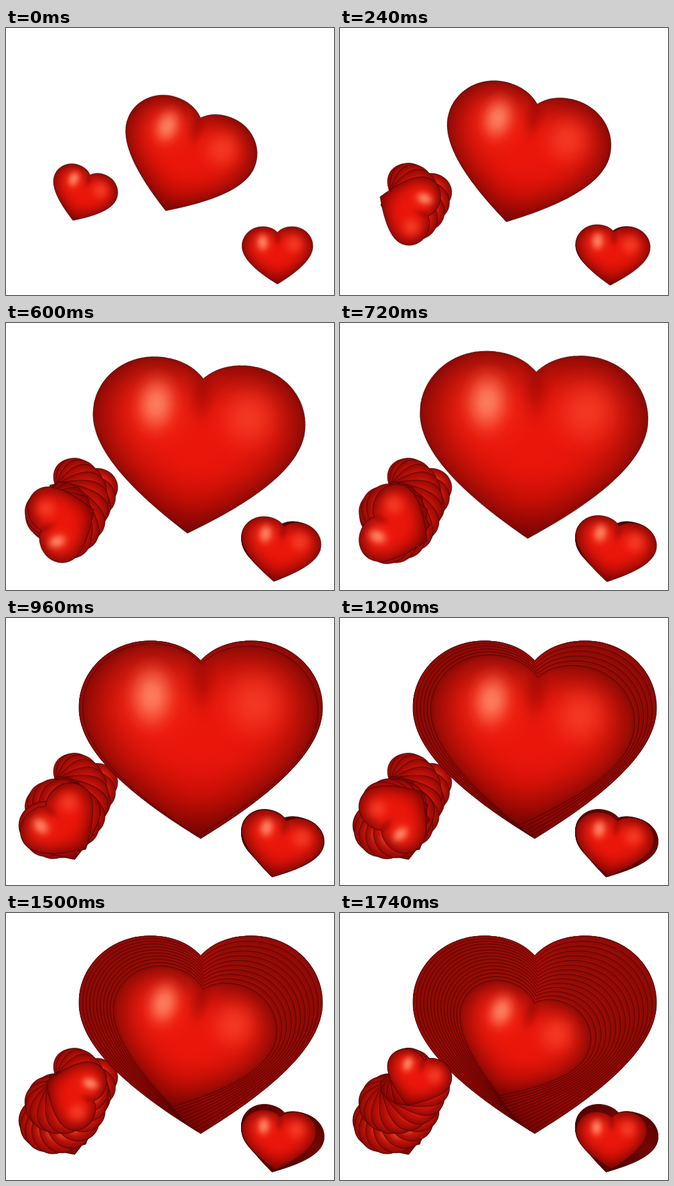
Write an HTML page with a canvas that moves like this. It is 512 by 418 pixels and loops after 1.8 s.

```html
<!DOCTYPE html>
<html lang="en">
<head>
<meta charset="utf-8">
<title>Hearts</title>
<style>
html, body { margin: 0; width: 100%; height: 100%; overflow: hidden; background: #fff; }
canvas { display: block; }
</style>
</head>
<body>
<canvas id="stage" width="512" height="418"></canvas>
<script>
const ctx = document.getElementById('stage').getContext('2d');
const STEP = 60, FRAMES = 30, LAST = 14;
const W = 400, H = 330;

// Heart outline around its own centre, 380 x 309 units
const heart = new Path2D();
heart.moveTo(0, -123.5);
heart.bezierCurveTo(20, -145, 48, -154.5, 79, -154.5);
heart.bezierCurveTo(141, -154.5, 190, -108, 190, -50);
heart.bezierCurveTo(190, 20, 105, 90, 0, 154.5);
heart.bezierCurveTo(-105, 90, -190, 20, -190, -50);
heart.bezierCurveTo(-190, -108, -141, -154.5, -79, -154.5);
heart.bezierCurveTo(-48, -154.5, -20, -145, 0, -123.5);
heart.closePath();

function glow(g, x, y, rx, ry, rgb, alpha) {
  g.save();
  g.translate(x, y);
  g.scale(rx, ry);
  const fill = g.createRadialGradient(0, 0, 0, 0, 0, 1);
  [1, 0.85, 0.48, 0.14, 0].forEach((a, i) =>
    fill.addColorStop(i / 4, `rgba(${rgb},${a * alpha})`));
  g.fillStyle = fill;
  g.fillRect(-1, -1, 2, 2);
  g.restore();
}

function innerShade(g, blur, color) {
  const ring = new Path2D();
  ring.rect(-600, -600, 1200, 1200);
  ring.addPath(heart);
  g.save();
  g.shadowColor = color;
  g.shadowBlur = blur;
  g.fillStyle = '#500000';
  g.fill(ring, 'evenodd');
  g.restore();
}

function makeSprite() {
  const c = document.createElement('canvas');
  c.width = W;
  c.height = H;
  const g = c.getContext('2d');
  g.translate(W / 2, H / 2);
  g.clip(heart);
  const base = g.createLinearGradient(0, -155, 0, 155);
  base.addColorStop(0, '#ea180c');
  base.addColorStop(0.6, '#ea160a');
  base.addColorStop(1, '#d00c04');
  g.fillStyle = base;
  g.fillRect(-W / 2, -H / 2, W, H);
  innerShade(g, 88, 'rgba(70,0,0,0.97)');
  innerShade(g, 12, 'rgba(70,0,0,0.2)');
  glow(g, 0, -98, 34, 72, '130,0,0', 0.4);
  glow(g, -79, -66, 84, 94, '250,60,36', 0.6);
  glow(g, -79, -70, 48, 66, '255,145,110', 0.8);
  glow(g, 88, -62, 74, 78, '248,66,42', 0.75);
  return c;
}

const sprite = makeSprite();

// Start and end of each heart: x, y, width scale, height scale, turn; bow bends the path
const hearts = [
  { from: [279.5, 205.4, 0.557, 0.557, 20.5], to: [304, 190.5, 1, 1, 0], bow: 0 },
  { from: [119.4, 261.7, 0.2725, 0.2725, 20.5], to: [89.5, 329.3, 0.345, 0.335, 340], bow: -8.5 },
  { from: [423.7, 356, 0.291, 0.291, 0], to: [428, 356.7, 0.345, 0.325, 15], bow: 0 }
];

function drawHeart(h, u) {
  const [x, y, sx, sy, turn] = h.from.map((a, i) => a + (h.to[i] - a) * u);
  ctx.save();
  ctx.translate(x + h.bow * Math.sin(Math.PI * u), y);
  ctx.rotate(turn * Math.PI / 180);
  ctx.scale(sx, sy);
  ctx.drawImage(sprite, -W / 2, -H / 2);
  ctx.lineWidth = 0.9 / sx;
  ctx.strokeStyle = 'rgba(45,0,0,0.55)';
  ctx.stroke(heart);
  ctx.restore();
}

// Every earlier pose stays on the stage until the loop restarts
function render(frame) {
  ctx.fillStyle = '#fff';
  ctx.fillRect(0, 0, 512, 418);
  ctx.imageSmoothingQuality = 'high';
  for (let i = 0; i <= frame; i++) {
    const pose = Math.min(i, FRAMES - 1 - i);
    hearts.forEach(h => drawHeart(h, pose / LAST));
  }
}

let shown = -1;
function tick() {
  const frame = Math.floor(performance.now() / STEP) % FRAMES;
  if (frame !== shown) render(shown = frame);
  requestAnimationFrame(tick);
}
tick();
</script>
</body>
</html>
```
